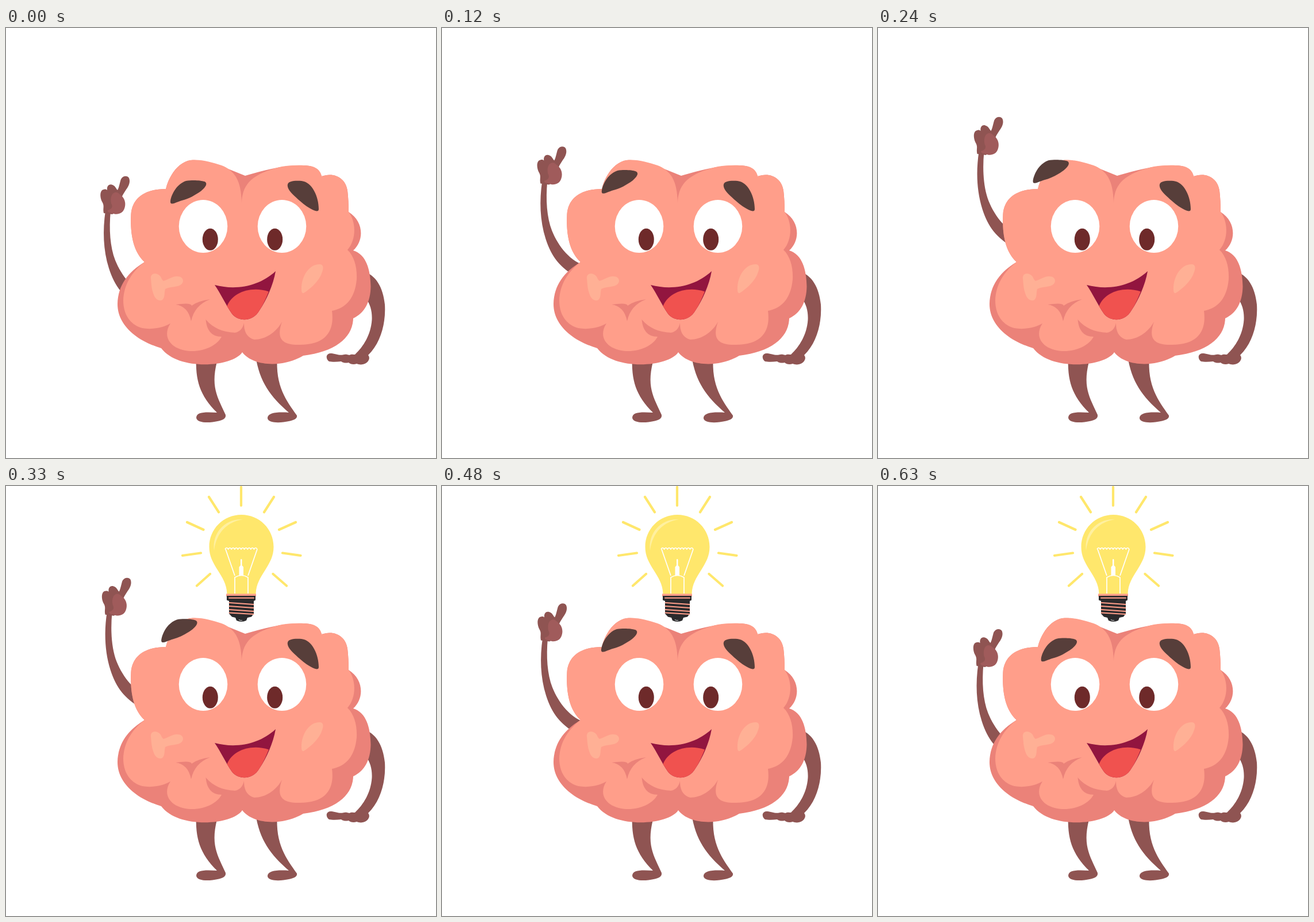
Write an HTML page that moves like this. It is 748x748 px and loops after 660 ms.

```html
<!DOCTYPE html>
<html lang="en">
<head>
<meta charset="utf-8">
<title>Bright idea</title>
<style>
  html, body { margin: 0; width: 100%; height: 100%; overflow: hidden; background: #fff; }
  svg { display: block; width: 100vw; height: 100vh; }
  .limb { fill: #8f5452; }
  .palm { fill: #a05b5b; }
  .shade { fill: #eb8279; }
  .skin { fill: #ff9e8a; }
  .glow { fill: #ffb095; }
  .brow { fill: #573e3a; }
  .pupil { fill: #6e2a2a; }
  .ray { stroke: #ffe76c; stroke-width: 4.2; stroke-linecap: round; fill: none; }
  .wire { stroke: #fff; stroke-width: 1.7; stroke-linejoin: round; fill: none; }
  .thread { stroke: #ff9e8a; stroke-width: 1.9; stroke-linecap: round; fill: none; }
</style>
</head>
<body>
<svg viewBox="0 0 748 748">
  <g id="bulb" visibility="hidden">
    <path class="ray" d="M409 2V34M353 19L370 45.500M466 19L449 45.500M315 63L343.500 76M504 63L475 76M307 121L339 116.500M512.500 121L481 116.500M332 173.500L355 153M488 173.500L464.500 153"/>
    <path fill="#ffe76c" d="M409.500 50C441 50 465.500 75 465.500 106C465.500 122 459 133 451 146C443 159 435 170 434.500 188H384.500C384 170 376 159 368 146C360 133 353.500 122 353.500 106C353.500 75 378 50 409.500 50Z"/>
    <path fill="#fff09f" d="M362 112C358 82 381 56 412 58C386 62 366 80 362 112Z"/>
    <path id="coil" class="wire"/>
    <path class="wire" d="M382 110L398 156M437 110L421 156M398 187V159Q409.500 152 421 159V187"/>
    <path fill="#fff" d="M408 128Q409.200 126 410.500 128V138L413 141V156H405.500V141L408 138Z"/>
    <path class="skin" d="M383 187.500H435V192H383Z"/>
    <path fill="#2b2a2c" d="M384 191H434V198.500L431 200V222L427 227.500L420 229L418 234Q409.500 238 401 234L399 229L393 227.500L388 222V200L384 198.500Z"/>
    <path class="thread" d="M388 194.800H431M388.500 203L430.500 206M388.500 209L430.500 212M388.500 215L430.500 218M388.500 220.500L430.500 223"/>
    <path d="M405 232.500Q408 234.500 411 234" fill="none" stroke="#fff" stroke-width=".8"/>
  </g>

  <g id="arm">
    <path class="limb" d="M173 318C168 352 169 386 179 418C189 450 205 468 230 483L252 493V466C222 459 201 431 190 404C181 381 179 350 182 318Z"/>
    <path class="limb" d="M170 322C168 313 172 310 167 302C163 294 163 282 170 281C173 280 175 281 176 282C175 275 179 271 184 272.500C190 274 191 279 194 282C197 277 198 268 200 263C203 257 211 256 214 261C217 268 213 276 209 281C206 286 203 290 202 293L204 312L185 324Z"/>
    <path class="palm" d="M183 305C181 295 184 287 190 286C195 285 198 290 201 292C207 297 209 306 206 314C203 323 193 326 184 322C179 321 176 320 177 317C183 316 187 311 183 305Z"/>
  </g>

  <path class="limb" d="M622 424C643 429 656 451 659 481C661 513 652 548 630 569C634 574 631 580 626 583C622 586 614 586 610 584C605 586 599 585 596 582C592 583 587 583 583 580C575 581 567 581 562 580C556 576 556 567 564 566C573 566 579 570 586 568.500C590 567 594 568 597 569C601 567 604 568 607 568C622 554 635 533 636.500 507C637 493 634 481 626 470Z"/>

  <path class="limb" d="M331 570C329 613 337 639 367 669C349 668 331 667 331 678C332 688 355 687 368 684C378 682 383 679 382 673C369 643 353 624 370 570Z"/>
  <path class="limb" d="M434 570C441 616 460 641 492 669C475 668 455 668 455 679C456 688 479 687 492 684C502 682 507 679 506 674C488 648 468 624 472 570Z"/>

  <path class="shade" d="M278 280C284 255 301 233 321 230C347 227 384 244 416 257C447 248 480 239 516 239C535 239 546 245 549 258C571 250 591 261 594 283Q596 300 596 320C623 337 623 370 604 387C627 394 634 421 634.500 450C634 476 624 496 604 505C603 539 573 563 517 570C480 592 429 588 411 564C394 590 300 597 270 557C227 544 194 517 194 480C195 447 212 425 241 407C220 388 216 355 217.500 324C220 292 247 280 278 280Z"/>
  <path class="skin" d="M278 280C284 255 301 233 321 230C340 228 358 234 375 239C403 250 409 273 410 304C411 270 430 253 480 241C500 238 526 238 536 242Q547 247 549 258C571 250 591 261 594 283Q596 300 596 320C609 337 610 367 594 386C606 397 611 417 610 437C607 470 592 487 567 492C571 521 562 551 511 551C474 552 472 535 480 511C470 530 450 542 432 542C418 538 414 527 414 513C412 523 406 529 398 530C376 529 359 521 347.500 507C349 525 357 537 375 537C367 552 346 562 324 562C291 562 269 540 286 514C272 522 252 525 237 522C215 516 204 497 204 474C205 446 219 424 241 407C220 388 216 355 217.500 324C220 292 247 280 278 280Z"/>
  <path class="shade" d="M295 481Q322 477 323 483Q333 475 355 472Q328 482 322 510Q317 484 295 481Z"/>
  <path class="glow" d="M252 436C251 428 258 425 265 429C271 432 270 438 274 440C282 438 287 433 296 432C306 431 311 438 306 445C299 452 286 449 277 454C275 461 277 468 272 473C266 476 259 471 257 464C253 454 253 446 252 436ZM514 456C513 433 527 411 545 411C554 411 552 420 549 427C543 443 526 456 518 461Q514 462 514 456Z"/>

  <g fill="#fff">
    <ellipse cx="343" cy="345" rx="42.300" ry="46"/>
    <ellipse cx="480" cy="345" rx="42.300" ry="46"/>
  </g>
  <ellipse class="pupil" cx="355.300" cy="367.700" rx="13.500" ry="19"/>
  <ellipse class="pupil" cx="467.700" cy="367.700" rx="13.500" ry="19"/>
  <path class="brow" d="M490 272C491 266 503 265 514 266C533 268 544 294 544 315C544 320 539 319 533 316C523 311 516 305 508 298C498 289 488 280 490 272Z"/>
  <path id="brow" class="brow" d="M286 301C288 288 298 271 313 266C324 264 339 265 345 267C352 270 347 277 340 283C329 291 318 297 306 300C299 302 294 305 290 305.500C286 306 286 304 286 301Z"/>

  <path fill="#92153f" d="M363 447C401 457 441 449 469 423C465 447 453 473 441 491C430 511 405 512 393 497C382 481 374 463 363 447Z"/>
  <path fill="#f0524f" d="M384.500 484C393 461 425 448 457 458.500C452 471 447 482 441 491C430 511 405 512 393 497Z"/>
</svg>
<script>
  const LOOP = 660, STEP = 30, PEAK = 270;
  const $ = id => document.getElementById(id);
  const arm = $('arm'), brow = $('brow'), bulb = $('bulb');

  // scalloped filament
  $('coil').setAttribute('d', 'M381 110' + 'q2.800 -5 5.600 0'.repeat(10));

  // offsets [x, y] at the top of the gesture and at the end of the loop
  const poses = [
    [arm, [2.8, -116], [1.4, 0]],
    [brow, [-18.5, -40.2], [-1, 3]]
  ];
  const mix = (a, b, k) => a + (b - a) * k;

  function draw(now) {
    const t = Math.floor((now % LOOP) / STEP) * STEP;
    const rising = t < PEAK;
    const k = rising ? t / PEAK : (t - PEAK) / (LOOP - PEAK);
    for (const [el, top, end] of poses) {
      const [from, to] = rising ? [[0, 0], top] : [top, end];
      el.setAttribute('transform',
        `translate(${mix(from[0], to[0], k)} ${mix(from[1], to[1], k)})`);
    }
    bulb.setAttribute('visibility', rising ? 'hidden' : 'visible');
  }

  const start = performance.now();
  function tick() {
    draw(performance.now() - start);
    requestAnimationFrame(tick);
  }
  tick();
</script>
</body>
</html>
```
